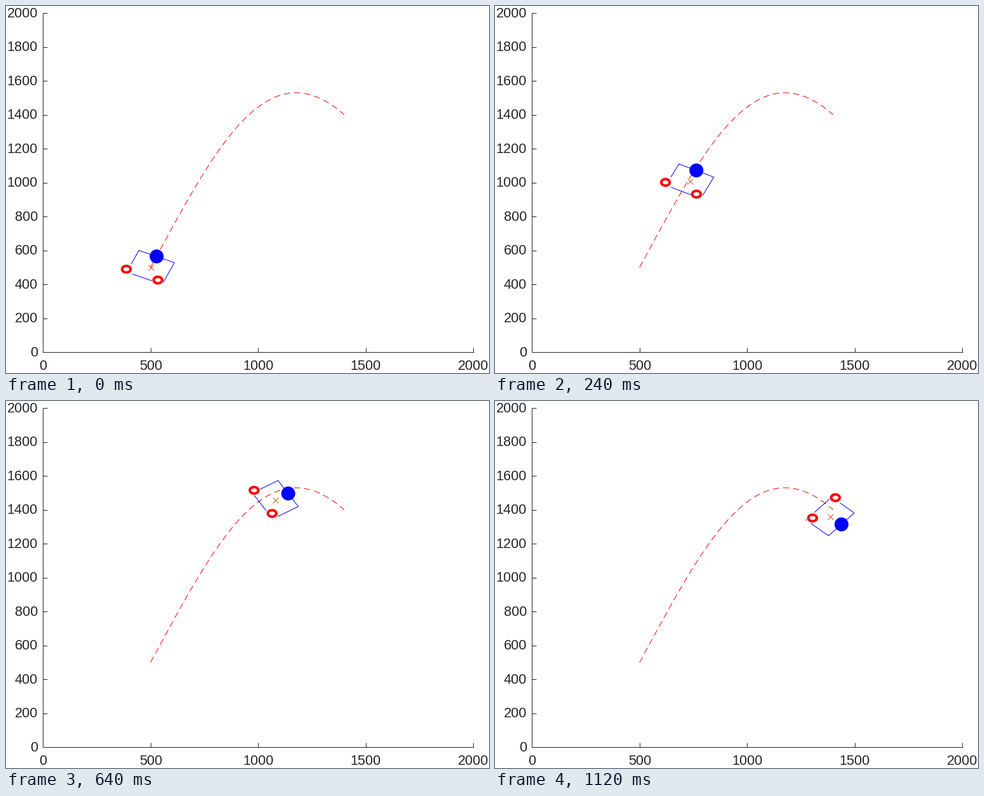
Recreate the animation shown at these times as a matplotlib script. Size 761 by 579 pixels, loop 1.2 s.

```python
import numpy as np
import matplotlib.pyplot as plt
from matplotlib.animation import FuncAnimation
from matplotlib.patches import Circle, Ellipse, Rectangle

W, H = 761, 579
STEPS = 15
PX = 0.72  # one pixel in points at 100 dpi
INK = "#262626"

plt.rcParams["font.family"] = "Liberation Sans"
fig = plt.figure(figsize=(W / 100, H / 100), dpi=100, facecolor="white")
ax = fig.add_axes([0, 0, 1, 1])
ax.set_xlim(0, W)
ax.set_ylim(H, 0)
ax.axis("off")


def to_px(p):
    """Map plot units (0..2000) to stage pixels."""
    return np.asarray(p, float) * (0.339, -0.2675) + (58.3, 546.1)


def line(xs, ys, color, **kw):
    return ax.plot(xs, ys, color=color, lw=PX, solid_capstyle="butt", **kw)[0]


def label(x, y, v, ha):
    ax.text(x, y, str(v), size=15.6, color=INK, ha=ha, va="center")


# Axes, ticks and labels
line([58, 58], [11, 546], INK)
line([58, 737], [546, 546], INK)
for v in range(0, 2001, 500):
    x = to_px([v, 0])[0]
    line([x, x], [539, 546], INK)
    label(x, 568.8, v, "center")
for v in range(0, 2001, 200):
    y = to_px([0, v])[1]
    line([58, 65], [y, y], INK)
    label(50, y + 1.2, v, "right")

# Planned path: one cubic Bezier curve
ends = np.array([(500, 500), (800, 1200), (1040, 1803), (1400, 1400)])
t = np.linspace(0, 1, 80)[:, None]
path = ((1 - t) ** 3 * ends[0] + 3 * t * (1 - t) ** 2 * ends[1]
        + 3 * t ** 2 * (1 - t) * ends[2] + t ** 3 * ends[3])
line(*to_px(path).T, "red", dashes=(10, 6), dash_capstyle="butt", zorder=2)

# Robot motion: the heading swings over in an S-curve while the drive slows
# down to a crawl; the position is the sum of the steps along the heading.
k = np.arange(STEPS)
heading = np.radians(66.8 - 115 / (1 + np.exp(-0.6 * (k - 9.36))))
step = np.maximum(56, 221.8 - 17.7 * k)
step[0] = 0
centers = 500 + np.cumsum(
    step[:, None] * np.stack([np.cos(heading), np.sin(heading)], -1), axis=0)

# Parts in the robot frame: (ahead, left)
BODY = [(70, 90), (70, -90), (-70, -90), (-70, 90), (70, 90)]
WHEELS = [(-55, 99), (-55, -61)]
NOSE = (70.5, 0)
PAD = np.array([18, 16.5])

body = line([], [], "blue", zorder=3)
cross = ax.plot([], [], "x", color="#D95319", ms=9 * PX, mew=PX, zorder=6)[0]
nose = ax.add_patch(Circle((0, 0), 11, fc="blue", ec="none", zorder=7))
pads = [ax.add_patch(Rectangle((0, 0), *PAD, fc="white", ec="none", zorder=4))
        for _ in WHEELS]
rims = [ax.add_patch(Ellipse((0, 0), 13.4, 10.3, fc="white", ec="red",
                             lw=4 * PX, zorder=5)) for _ in WHEELS]


def draw(i):
    c, s = np.cos(heading[i]), np.sin(heading[i])

    def place(p):
        return to_px(np.asarray(p) @ np.array([[c, s], [-s, c]]) + centers[i])

    body.set_data(*place(BODY).T)
    cross.set_data(*place([(0, 0)]).T)
    nose.center = tuple(place(NOSE))
    for pad, rim, hub in zip(pads, rims, place(WHEELS)):
        pad.set_xy(hub - PAD / 2)
        rim.center = tuple(hub)
    return [body, cross, nose, *pads, *rims]


anim = FuncAnimation(fig, draw, frames=STEPS, init_func=lambda: draw(0),
                     interval=80, repeat=True, repeat_delay=0, blit=False)
plt.show()
```
